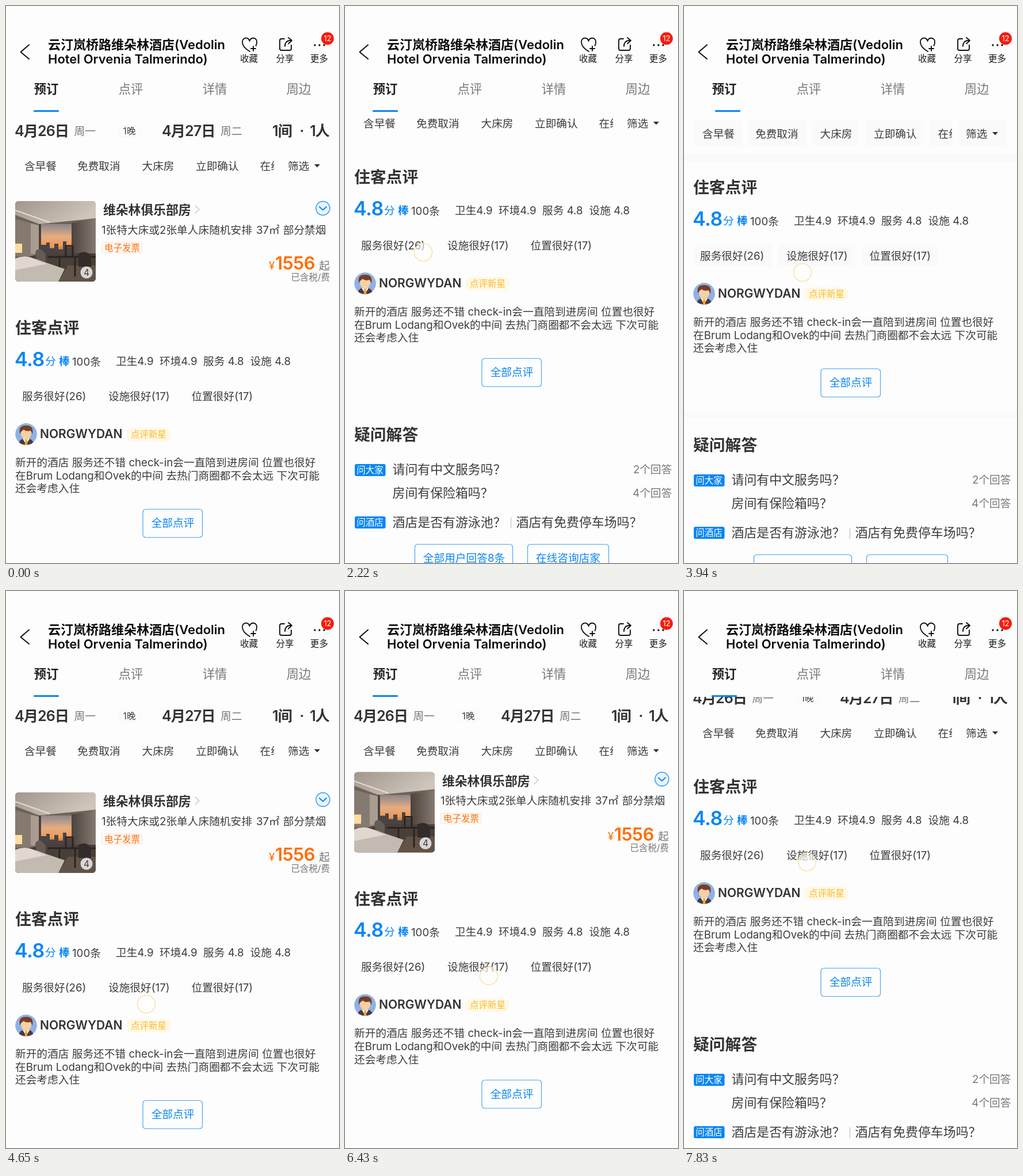
Write an HTML page that moves like this. It is 579 by 968 pixels and loops after 8 s.

```html
<!DOCTYPE html>
<html lang="zh-CN">
<head>
<meta charset="utf-8">
<title>酒店详情</title>
<style>
html, body { margin: 0; width: 100%; height: 100%; overflow: hidden; background: #fdfdfd; }
svg { display: block; }
text {
  font: 18.7px Inter, "Noto Sans CJK SC", "Noto Sans CJK", sans-serif;
  fill: #3c3c3c;
  transform: translateY(.37em); /* y marks the middle of the line */
}
.bold { font-weight: 600; fill: #333; }
.title { font-size: 22px; font-weight: 600; fill: #0c0c0c; }
.label { font-size: 15.5px; fill: #1a1a1a; }
.tab { font-size: 21.3px; fill: #777; }
.tab.on { font-weight: 700; fill: #222; }
.date { font-size: 25.2px; letter-spacing: -1px; }
.room { font-size: 21.8px; }
.heading { font-size: 27.8px; }
.ask { font-size: 21.9px; }
.user { font-size: 21px; }
.price { font-size: 31px; font-weight: 600; letter-spacing: -.5px; }
.score { font-size: 34px; font-weight: 600; letter-spacing: -.5px; }
.small { font-size: 15.5px; }
.grey { fill: #777; }
.blue { fill: #0a86f3; }
.orange { fill: #ff6d00; }
.white { fill: #fff; }
.end { text-anchor: end; }
.mid { text-anchor: middle; }
.line { fill: none; stroke-linecap: round; stroke-linejoin: round; }
.button { fill: none; stroke: #4aa5f8; stroke-width: 1.2; }
.tint { fill: #fafafa; visibility: hidden; }
.tinted .tint { visibility: visible; }
.page { fill: #fdfdfd; }
</style>
</head>
<body>
<svg id="stage" width="579" height="968" viewBox="0 0 579 968">
  <defs>
    <linearGradient id="dusk" x2="0" y2="1">
      <stop stop-color="#8d878c"/>
      <stop offset=".4" stop-color="#e3ad82"/>
      <stop offset=".7" stop-color="#ee9a55"/>
      <stop offset="1" stop-color="#6c5147"/>
    </linearGradient>
    <linearGradient id="ceiling" x2="1" y2=".4">
      <stop stop-color="#a0968b"/>
      <stop offset="1" stop-color="#cfc6bb"/>
    </linearGradient>
    <linearGradient id="drapes">
      <stop stop-color="#4c433d"/>
      <stop offset="1" stop-color="#857a70"/>
    </linearGradient>
    <clipPath id="photo"><rect width="140" height="140" rx="6"/></clipPath>
    <clipPath id="tallPhoto"><rect width="140" height="159" rx="6"/></clipPath>
    <clipPath id="face"><circle r="19"/></clipPath>
    <clipPath id="filters"><rect x="0" y="240" width="466" height="70"/></clipPath>
  </defs>
  <rect class="page" width="579" height="968"/>

  <!-- Scrolling content, with y = 0 at the review heading -->
  <g id="content">
    <g transform="translate(16 -420)" clip-path="url(#tallPhoto)">
      <rect width="140" height="159" fill="#cfc4b6"/>
      <path d="M0 0H34V159H0Z" fill="#8f7c69"/>
      <path d="M0 98H32V124L0 120Z" fill="#d8cec2"/>
      <circle cx="9" cy="88" r="8" fill="#f2d9a9"/>
      <path d="M0 118L32 122V159H0Z" fill="#7c6a5d"/>
      <path d="M34 0H61V159H34Z" fill="#392c25"/>
      <path d="M61 0H104V143L61 159Z" fill="#a6784f"/>
      <path d="M69 127h11v8H69Z" fill="#453c37"/>
      <path d="M61 159L108 139H140V159Z" fill="#59473d"/>
      <path d="M95 133L124 104 140 99V150H108Z" fill="#ece3d8"/>
      <path d="M93 135Q110 131 123 150L108 157Z" fill="#35374a"/>
    </g>
    <circle cx="140" cy="-276" r="10.5" fill="#eee" opacity=".85"/>
    <text class="small mid" x="140" y="-276">10</text>
    <rect x="166.5" y="-348" width="70" height="18" rx="2" fill="none" stroke="#ffe1c8"/>
    <text class="small orange" x="171" y="-339">电子发票</text>
    <text class="orange" x="471" y="-315">¥</text>
    <text class="price orange end" x="537" y="-319">547</text>
    <text class="grey end" x="563" y="-315">起</text>
    <text class="small grey end" x="563" y="-295">已含税/费</text>
    <rect x="425" y="-279" width="138.5" height="18" rx="3" fill="none" stroke="#ffa35c"/>
    <path d="M496 -278v16" stroke="#ffa35c" stroke-dasharray="2 2"/>
    <text class="small orange" x="429" y="-270">节日特惠</text>
    <text class="small orange end" x="559" y="-270">优惠360</text>

    <g transform="translate(16 -220)" clip-path="url(#photo)">
      <rect width="140" height="140" fill="#6d635a"/>
      <path d="M0 0H140V30L42 40 0 24Z" fill="url(#ceiling)"/>
      <path d="M0 16L60 37" stroke="#e8dccb" stroke-width="2"/>
      <path d="M0 31L37 41V96H0Z" fill="#857a6f"/>
      <path d="M27 39L41 42V92H27Z" fill="#aa9d8f"/>
      <rect x="41" y="40" width="59" height="54" fill="url(#dusk)"/>
      <path d="M41 94V40h4V76h9V72h6V82h8V74h7V84h8V70h6V80h11V94Z" fill="#4b4342"/>
      <path d="M98 38L140 31V112H98Z" fill="url(#drapes)"/>
      <path d="M0 103L45 91H140V140H0Z" fill="#493f39"/>
      <path d="M75 140L92 112H140V140Z" fill="#625349"/>
      <path d="M35 91q0-9 10-7l8 8v16H38Z" fill="#645b54"/>
      <path d="M58 97H139M77 98V124M104 98V130M88 97V78h12V97" class="line" stroke="#2a2422" stroke-width="3"/>
      <path d="M110 91q14-7 22 5v18H110Z" fill="#332c29"/>
      <path d="M0 74H12V90H0Z" fill="#ffdda0"/>
      <path d="M0 102Q24 94 48 105L86 118 75 140H0Z" fill="#c3bab1"/>
      <path d="M0 100Q20 91 40 104L55 109 0 120Z" fill="#e0d8d0"/>
    </g>
    <circle cx="140" cy="-96" r="10.5" fill="#eee" opacity=".85"/>
    <text class="small mid" x="140" y="-96">4</text>
    <text class="bold room" x="169" y="-205">维朵林俱乐部房</text>
    <path class="line" d="M329 -212l7 6.5-7 6.5" stroke="#c8c8c8" stroke-width="1.5"/>
    <circle cx="551" cy="-207.5" r="12" fill="#e9f5ff" stroke="#2995f5" stroke-width="1.4"/>
    <path class="line" d="M545 -210l6 5.5 6-5.5" stroke="#0a86f3" stroke-width="2"/>
    <text x="166" y="-170">1张特大床或2张单人床随机安排</text>
    <text x="435" y="-170">37㎡</text>
    <text class="end" x="556.5" y="-170">部分禁烟</text>
    <rect x="166.5" y="-148" width="70" height="18" rx="2" fill="none" stroke="#ffe1c8"/>
    <text class="small orange" x="171" y="-139">电子发票</text>
    <text class="orange" x="457" y="-108">¥</text>
    <text class="price orange end" x="537" y="-112">1556</text>
    <text class="grey end" x="563" y="-108">起</text>
    <text class="small grey end" x="563" y="-88">已含税/费</text>

    <rect class="tint" y="-57" width="579" height="12"/>
    <text class="bold heading" x="16" y="0">住客点评</text>
    <text class="score blue" x="15" y="54">4.8</text>
    <text class="blue" x="68" y="58">分</text>
    <text class="blue" x="92" y="58" font-weight="600" style="font-weight:600">棒</text>
    <text x="115" y="59">100条</text>
    <rect class="tint" x="178" y="38" width="1.5" height="40"/>
    <text x="191" y="58">卫生4.9</text>
    <text x="267" y="58">环境4.9</text>
    <text x="343" y="58">服务 4.8</text>
    <text x="424.5" y="58">设施 4.8</text>
    <rect class="tint" x="17" y="100" width="136" height="38" rx="4"/>
    <rect class="tint" x="165" y="100" width="132" height="38" rx="4"/>
    <rect class="tint" x="310" y="100" width="132" height="38" rx="4"/>
    <text x="28" y="119">服务很好(26)</text>
    <text x="178" y="119">设施很好(17)</text>
    <text x="322.5" y="119">位置很好(17)</text>

    <g transform="translate(35 185)" clip-path="url(#face)">
      <circle r="19" fill="#8fb1e5"/>
      <path d="M-13 19Q-13 9-4 8H4Q13 9 13 19Z" fill="#493b3e"/>
      <path d="M-6 8H6L0 18Z" fill="#fff"/>
      <path d="M-1.5 10h3l1 9h-5Z" fill="#f2a12d"/>
      <rect x="-3" y="4" width="6" height="6" fill="#eab98d"/>
      <ellipse cy="-1" rx="9" ry="10" fill="#f8d0a4"/>
      <path d="M-11 0Q-14-15-1-15 14-16 11 0L8-6Q-1-4-4-8L-9-4Z" fill="#783e26"/>
    </g>
    <text class="bold user" x="59" y="184">NORGWYDAN</text>
    <rect x="209" y="174" width="77" height="23" rx="9" fill="#fff8e4"/>
    <text class="small" x="217" y="185" style="fill:#f9bb2d">点评新星</text>
    <text x="16" y="234">新开的酒店 服务还不错 check-in会一直陪到进房间 位置也很好</text>
    <text x="16" y="257">在Brum Lodang和Ovek的中间 去热门商圈都不会太远 下次可能</text>
    <text x="16" y="279.5">还会考虑入住</text>
    <rect class="button" x="238" y="315.5" width="103.5" height="49" rx="5"/>
    <text class="blue mid" x="290" y="339.5">全部点评</text>

    <rect class="tint" y="391" width="579" height="10"/>
    <text class="bold heading" x="16" y="448">疑问解答</text>
    <rect x="17" y="499" width="53.5" height="21" rx="3" fill="#0a86f3"/>
    <text class="small white mid" x="43.5" y="509.5">问大家</text>
    <text class="ask" x="82.5" y="507.5">请问有中文服务吗？</text>
    <text class="grey end" x="568.5" y="508">2个回答</text>
    <text class="ask" x="82.5" y="549">房间有保险箱吗？</text>
    <text class="grey end" x="568.5" y="549.5">4个回答</text>
    <rect x="17" y="590" width="53.5" height="21" rx="3" fill="#0a86f3"/>
    <text class="small white mid" x="43.5" y="600.5">问酒店</text>
    <text class="ask" x="82.5" y="600">酒店是否有游泳池？</text>
    <path d="M288.5 592v19" stroke="#ccc" stroke-width="1.5"/>
    <text class="ask" x="297.5" y="600">酒店有免费停车场吗？</text>
    <rect class="button" x="121.5" y="638.5" width="170" height="49" rx="5"/>
    <text class="blue mid" x="207" y="662">全部用户回答8条</text>
    <rect class="button" x="317.5" y="638.5" width="141" height="49" rx="5"/>
    <text class="blue mid" x="388" y="662">在线咨询店家</text>
    <rect class="tint" y="714" width="579" height="10"/>
  </g>

  <!-- Date and filter rows, pinned until the reviews push them up -->
  <g id="pinned">
    <rect class="page" y="100" width="579" height="213"/>
    <text class="bold date" x="15" y="217">4月26日</text>
    <text class="grey" x="118.5" y="217.5">周一</text>
    <rect x="196.5" y="208" width="38" height="19" rx="9" fill="none" stroke="#f3f3f3"/>
    <text class="small mid" x="214.5" y="217.5">1晚</text>
    <text class="bold date" x="271" y="217">4月27日</text>
    <text class="grey" x="373" y="217.5">周二</text>
    <text class="bold date" x="463" y="217">1间</text>
    <text class="bold date mid" x="514" y="217">·</text>
    <text class="bold date end" x="562" y="217">1人</text>
    <g clip-path="url(#filters)">
      <rect class="tint" x="18" y="254" width="81" height="46" rx="4"/>
      <rect class="tint" x="111" y="254" width="101" height="46" rx="4"/>
      <rect class="tint" x="223" y="254" width="81" height="46" rx="4"/>
      <rect class="tint" x="316" y="254" width="100" height="46" rx="4"/>
      <rect class="tint" x="428" y="254" width="101" height="46" rx="4"/>
      <text x="32" y="278">含早餐</text>
      <text x="124" y="278">免费取消</text>
      <text x="236.5" y="278">大床房</text>
      <text x="330" y="278">立即确认</text>
      <text x="441.5" y="278">在线付款</text>
    </g>
    <rect class="tint" x="478" y="254" width="82" height="46" rx="4"/>
    <text x="490" y="278">筛选</text>
    <path d="M536 275h10l-5 5.5Z" fill="#333"/>
  </g>

  <rect class="page" width="579" height="184"/>
  <path class="line" d="M40 67.5L25.5 80 40 92" stroke="#111" stroke-width="2"/>
  <text class="title" x="73" y="66.5">云汀岚桥路维朵林酒店(Vedolin</text>
  <text class="title" x="73" y="92">Hotel Orvenia Talmerindo)</text>
  <g class="line" stroke="#111" stroke-width="1.9">
    <path d="M424 79C417 75 411 69 411 63a6.3 6.3 0 0 1 12.5-2 6.3 6.3 0 0 1 12.5 2q0 3-1.5 6M426 74h8M430 70v8"/>
    <path d="M484 57h-5a3 3 0 0 0-3 3v14a3 3 0 0 0 3 3h14a3 3 0 0 0 3-3v-6M491 55l6 5-6 5.5M497 60h-4q-8 1-8 10"/>
  </g>
  <g fill="#111">
    <circle cx="537" cy="68" r="1.7"/>
    <circle cx="545" cy="68" r="1.7"/>
    <circle cx="553" cy="68" r="1.7"/>
  </g>
  <text class="label mid" x="422.5" y="91.5">收藏</text>
  <text class="label mid" x="485" y="91.5">分享</text>
  <text class="label mid" x="544.5" y="91.5">更多</text>
  <circle cx="559" cy="56.5" r="11" fill="#f61c0d"/>
  <text class="white mid" x="559" y="56.5" style="font-size:13px">12</text>
  <text class="tab mid" id="bookTab" x="70" y="144">预订</text>
  <text class="tab mid" id="reviewTab" x="217" y="144">点评</text>
  <text class="tab mid" x="363" y="144">详情</text>
  <text class="tab mid" x="509" y="144">周边</text>
  <rect id="underline" x="48" y="181" width="44" height="3" rx="1" fill="#0a86f3"/>

  <circle id="touch" r="15.5" fill="#fff" fill-opacity=".6" stroke="#fde2b0" stroke-width="1.7"/>
</svg>
<script>
const LOOP = 8000, PINNED_UNTIL = 371;
// start time, heading y, touch x, touch y
const poses = [
  [0, 559],
  [1200, 540, 140, 673], [1540, 497, 139, 629], [1880, 400, 138, 532],
  [2220, 297, 136, 428], [2560, 255, 137, 386], [2910, 215, 140, 346],
  [3260, 185, 146, 316], [3600, 240, 180, 388], [3940, 315, 206, 463],
  [4260, 420, 226, 568], [4650, 570, 244, 718], [5040, 708, 250, 855],
  [5390, 708, 253, 842], [5740, 651, 256, 784], [6080, 590, 254, 723],
  [6430, 534.5, 250, 669], [6780, 502, 246, 636], [7140, 477, 241, 611],
  [7490, 404, 228, 537], [7830, 340, 214, 471]
];
const slides = { 3260: 142, 3600: 147, 3940: 6 };
const el = id => document.getElementById(id);
const move = (id, x, y) => el(id).setAttribute("transform", `translate(${x} ${y})`);
let shown;

function show(pose) {
  const [start, heading, x, y] = pose;
  const onReviews = start >= 3260 && start < 3940;
  move("content", 0, heading);
  move("pinned", 0, Math.min(0, heading - PINNED_UNTIL));
  move("underline", slides[start] || 0, 0);
  el("bookTab").classList.toggle("on", !onReviews);
  el("reviewTab").classList.toggle("on", onReviews);
  el("stage").classList.toggle("tinted", start >= 2910 && start < 4260);
  el("touch").style.display = x ? "" : "none";
  if (x) move("touch", x, y);
}

const origin = performance.now();
function tick() {
  const time = (performance.now() - origin) % LOOP;
  const pose = poses.filter(([start]) => start <= time).pop();
  if (pose !== shown) show(shown = pose);
  requestAnimationFrame(tick);
}
tick();
</script>
</body>
</html>
```
